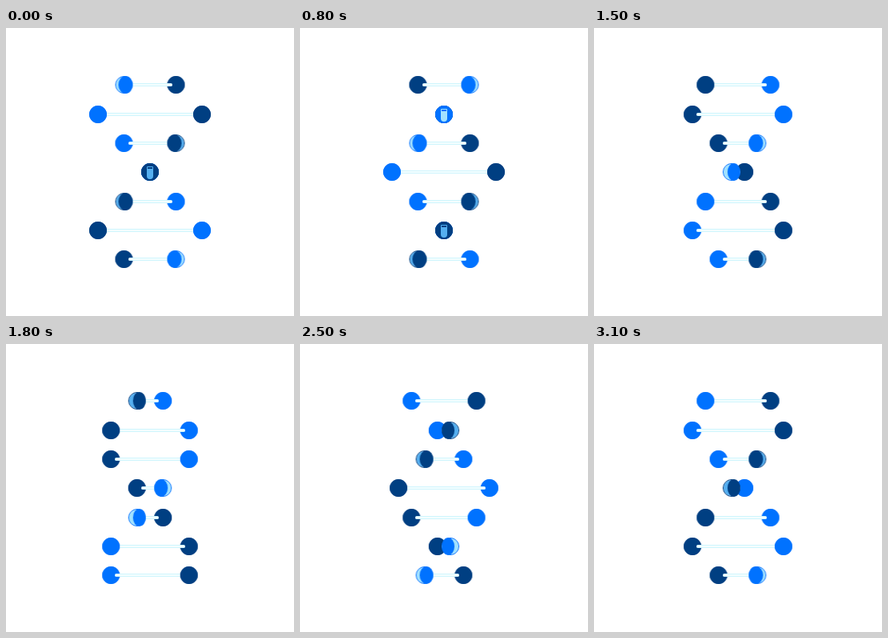
Write an HTML page that moves like this. It is 360 px wide and 360 px high and loops after 3200 ms.

```html
<!DOCTYPE html>
<html lang="en">
<head>
<meta charset="utf-8">
<title>Turning helix</title>
<style>
  html, body { margin: 0; width: 100%; height: 100%; overflow: hidden; background: #fff; }
  .row {
    --shift: calc((var(--i) - 9) * 400ms - 4ms);
    position: absolute; left: 115px; width: 130px; height: 0;
    top: calc(71.2px + var(--i) * 36.35px);
  }
  .ball {
    --at: var(--shift);
    position: absolute; left: -11px; top: -11px; width: 22px; height: 22px;
    box-sizing: border-box; border: 1px solid var(--color); border-radius: 50%;
    background: var(--glint) padding-box;
    animation: swing 3.2s var(--at) infinite, depth 3.2s step-end var(--at) infinite;
  }
  .blue { --color: #0072ff; --glint: #a2e2ff; }
  .navy { --color: #003f82; --glint: #55aff0; --at: calc(var(--shift) - 1600ms); }
  .ball::before {
    content: ""; position: absolute; inset: -1px; border-radius: 50%;
    background: var(--color);
    animation: cover 3.2s step-end var(--at) infinite;
  }
  /* Rod seen end-on, visible only at the centre crossing */
  .ball::after {
    content: ""; position: absolute; left: 6px; top: 6px; width: 8px; height: 13px;
    border-radius: 1px 1px 4px 4px; background: var(--glint);
    box-shadow: 0 -3px 0 -1px var(--color), 0 -3px 0 0 var(--glint);
    opacity: 0;
    animation: end-on 3.2s step-end var(--at) infinite;
  }
  .rod {
    position: absolute; z-index: 1; top: -2px; height: 4px; box-sizing: border-box;
    border: solid #cff5fd; border-width: 1px 0; border-radius: 2px; background: #f3feff;
    animation: stretch 1.6s var(--shift) infinite;
  }

  @keyframes swing {
    0%, 100% { transform: none; animation-timing-function: steps(16); }
    50% { transform: translateX(130px); animation-timing-function: steps(16); }
  }
  /* Both balls hide the rod's ends at the widest pose */
  @keyframes depth {
    0% { z-index: 2; }
    53.125%, 100% { z-index: 0; }
  }
  @keyframes cover {
    0% { left: -1px; right: -1px; }
    12.5% { left: 3px; right: -1px; animation-timing-function: steps(4); }
    25% { left: 6px; right: -1px; }
    25.001% { left: -1px; right: -1px; }
    28.125% { left: -1px; right: 5px; animation-timing-function: steps(4); }
    40.624% { left: -1px; right: 2px; }
    40.625%, 100% { left: -1px; right: -1px; }
  }
  @keyframes end-on {
    0% { opacity: 0; }
    25% { opacity: 1; }
    28.125%, 100% { opacity: 0; }
  }
  @keyframes stretch {
    0%, 100% { left: 5px; right: 5px; animation-timing-function: steps(8); }
    50% { left: 70px; right: 70px; animation-timing-function: steps(8); }
  }
</style>
</head>
<body>
<script>
  for (let i = 0; i < 7; i++) {
    const row = document.createElement("div");
    row.className = "row";
    row.style.setProperty("--i", i);
    for (const part of ["ball blue", "rod", "ball navy"]) {
      const el = document.createElement("div");
      el.className = part;
      row.append(el);
    }
    document.body.append(row);
  }
</script>
</body>
</html>
```
